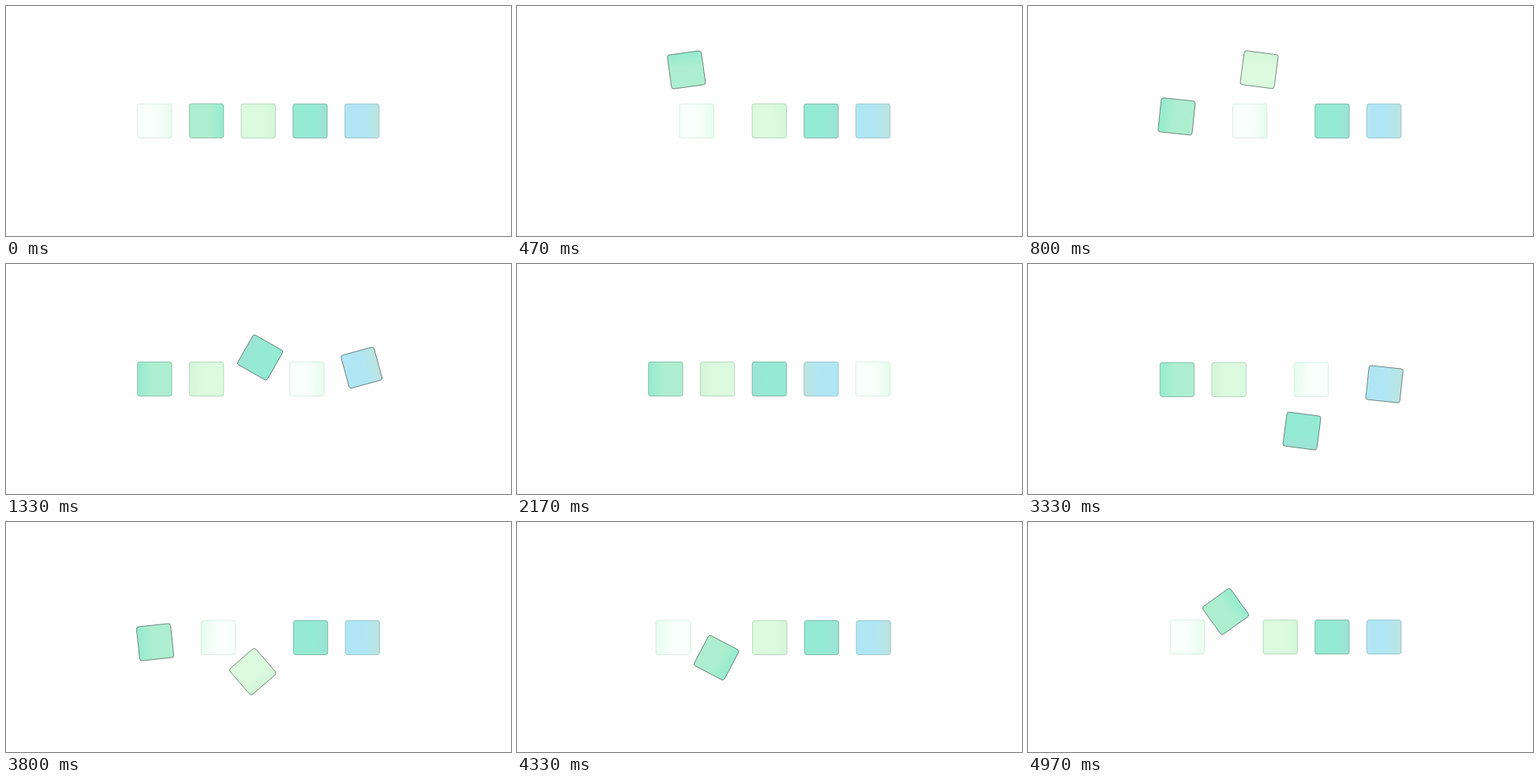
An HTML page for the animation above (5 s loop, 640 px wide and 292 px high).

```html
<!DOCTYPE html>
<html lang="en">
<head>
<meta charset="utf-8">
<title>Hopping squares</title>
<style>
  html, body { margin: 0; width: 100%; height: 100%; overflow: hidden; background: #fefefe; }
  svg { display: block; width: 640px; height: 292px; }
</style>
</head>
<body>
<svg viewBox="0 0 640 292"><defs></defs><g id="row"></g></svg>
<script>
const LOOP = 5000;
const STARTS = [0, 2530, 4718];           // each run is the previous one turned by 180°
const SLIDE = [40, 1920];                 // start and duration within a run
const HOPS = [[-20, 930], [458, 724], [800, 724], [1172, 846]];
const PITCH = 65.7, SIZE = 43.4, HEIGHT = 68;

// left colour, right colour, gradient start, edge
const SKINS = [
  ['#f8fffc', '#e7fcee', 0.5, '#c3e2d1'],
  ['#aeeed0', '#96ebd0', 0.55, '#5f9c85'],
  ['#dcfae0', '#d4f6da', 0.6, '#93c0a0'],
  ['#95ead3', '#9de3d5', 0.6, '#539486'],
  ['#b0e6f4', '#bce4de', 0.55, '#79abb0']
];
const FLYING_EDGE = '#33493f';

const row = document.getElementById('row');
const defs = document.querySelector('defs');

function make(tag, attrs, parent) {
  const el = document.createElementNS('http://www.w3.org/2000/svg', tag);
  for (const key in attrs) el.setAttribute(key, attrs[key]);
  return parent.appendChild(el);
}

const boxes = SKINS.map(([left, right, from, edge], i) => {
  const grad = make('linearGradient', { id: 'skin' + i }, defs);
  make('stop', { offset: from, 'stop-color': left }, grad);
  make('stop', { offset: 1, 'stop-color': right }, grad);
  return make('rect', {
    x: -SIZE / 2, y: -SIZE / 2, width: SIZE, height: SIZE, rx: 3,
    fill: `url(#skin${i})`, stroke: edge, 'stroke-width': 0.6
  }, row);
});

const progress = (t, [start, duration]) => Math.min(1, Math.max(0, (t - start) / duration));
const sine = u => (1 - Math.cos(Math.PI * u)) / 2;
const power = (u, p) => u < 0.5 ? (2 * u) ** p / 2 : 1 - (2 - 2 * u) ** p / 2;
const slotX = slot => (slot - 2) * PITCH;

function place(box, x, y, angle) {
  box.setAttribute('transform', `translate(${x} ${y}) rotate(${angle})`);
}

function draw(time) {
  const run = STARTS.filter(s => s <= time).length - 1;
  const t = time - STARTS[run];
  const turned = run % 2 === 1;

  row.setAttribute('transform',
    `translate(320.05 146.4) rotate(${turned ? 180 : 0}) translate(-.3 -.4)`);
  place(boxes[0], slotX(4 * power(progress(t, SLIDE), 1.5)), 0, 0);

  HOPS.forEach((hop, i) => {
    const slot = i + 1;
    const box = boxes[turned ? 5 - slot : slot];
    const r = sine(progress(t, hop));
    const lift = HEIGHT * (1 - Math.abs(1 - 2 * r) ** 1.28);
    place(box, slotX(slot - power(r, 2.4)), -lift, -180 * r);
    box.style.stroke = r > 0.005 && r < 0.995 ? FLYING_EDGE : '';
  });
}

function tick(now) {
  draw(now % LOOP);
  requestAnimationFrame(tick);
}
draw(0);
requestAnimationFrame(tick);
</script>
</body>
</html>
```
